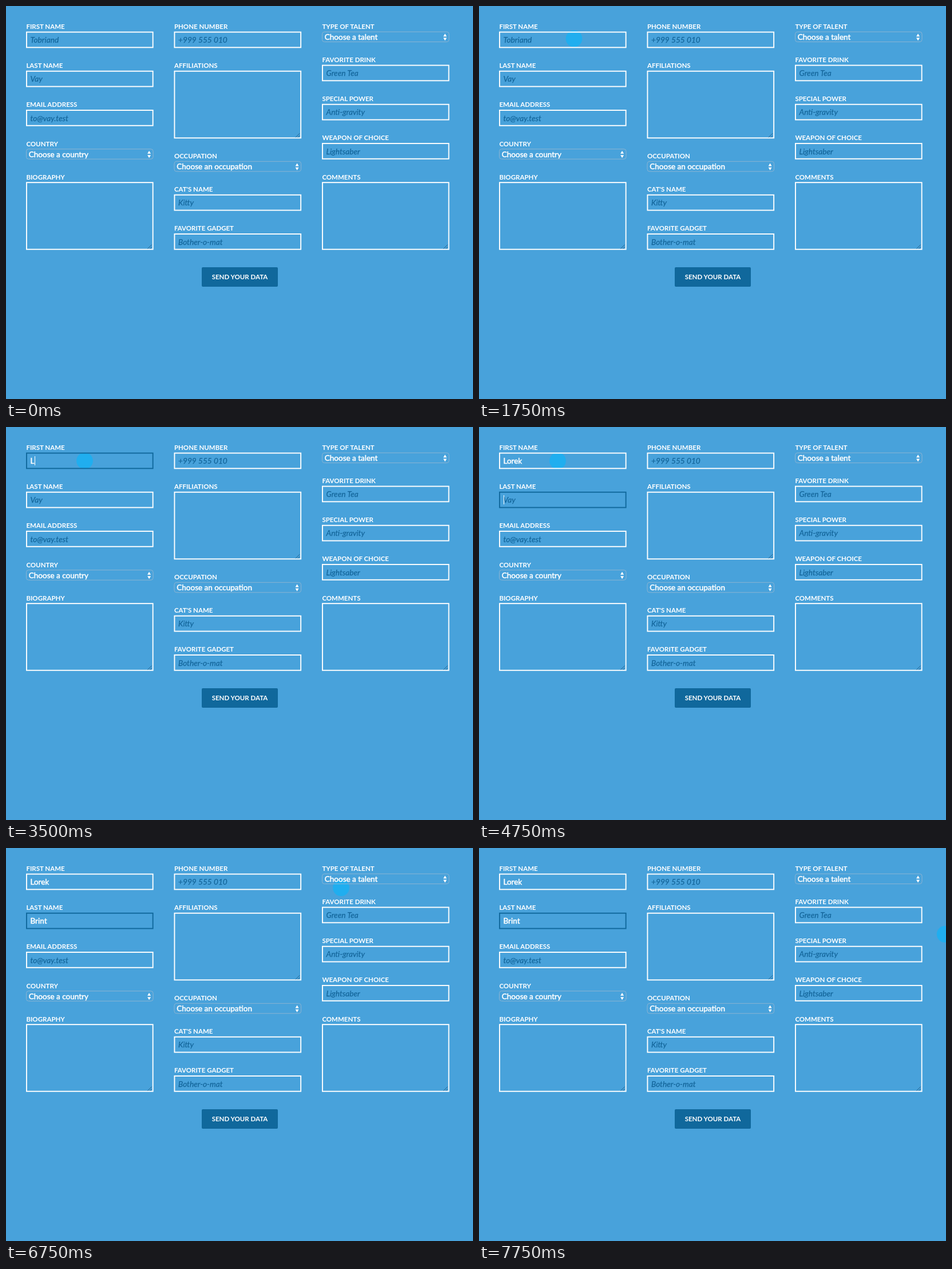
Animation, 816 px wide and 686 px high, one loop 8000 ms. Source, as an HTML page:

```html
<!DOCTYPE html>
<html lang="en">
<head>
<meta charset="utf-8">
<title>Form demo</title>
<style>
  html, body { margin: 0; width: 100%; height: 100%; overflow: hidden; background: #48a2db; }
  svg { display: block; font-family: Lato, sans-serif; font-size: 13.5px; fill: #fff; }
  .label { font-size: 11.5px; font-weight: 700; }
  .hint { font-size: 13.7px; font-style: italic; fill: #14669b; stroke: #14669b; stroke-width: .25; }
  .value { stroke: #fff; stroke-width: .5; }
  .box { fill: none; stroke: #fff; stroke-width: 1.9; }
  .box.focus { stroke: #10689c; }
  .select { fill: none; stroke: #8ab4d3; }
  .grip { fill: none; stroke: #23618c; }
  #dot { fill: #20aeef; }
  #ring { fill: none; stroke: #20aeef; stroke-width: 2; }
</style>
</head>
<body>
<svg id="stage" width="816" height="686" viewBox="0 0 816 686"></svg>
<script>
const LOOP = 8000, STEP = 250, TYPING = 750;
const LEFT = 35, TOP = 44.6, WIDTH = 222.6, COLUMN = 258.5, GAP = 39.5;
const HEIGHT = { input: 28.7, area: 118.5, select: 18.5 };

const text = (x, y, cls, str, id = '') =>
  `<text x="${x}" y="${y}" class="${cls}" id="${id}">${str}</text>`;
const box = (x, y, h, id = '') =>
  `<rect class="box" id="${id}" x="${x + .95}" y="${y + .95}" width="${WIDTH - 1.9}" height="${h - 1.9}"/>`;

const draws = {
  input: (x, y, h, hint, id) =>
    box(x, y, h, id && id + 'Box') + text(x + 7.5, y + 19.5, 'hint', hint, id && id + 'Hint') +
    (id ? text(x + 7.5, y + 19.5, 'value', '', id + 'Value') : ''),

  area(x, y, h) {
    const r = x + WIDTH - 2, b = y + h - 2;
    return box(x, y, h) + `<path class="grip" d="M${r - 8} ${b}l7-7M${r - 4} ${b}l3-3"/>`;
  },

  select(x, y, h, value) {
    const cx = x + WIDTH - 7.5;
    return `<rect class="select" x="${x + .5}" y="${y + .5}" width="${WIDTH - 1}" height="${h - 1}" rx="4"/>` +
      text(x + 4.8, y + 14.3, 'value', value) +
      `<path d="M${cx - 3} ${y + 8.6}h6l-3-5zM${cx - 3} ${y + 11}h6l-3 5z"/>`;
  }
};

const columns = [
  [
    ['input', 'FIRST NAME', 'Tobriand', 'first'],
    ['input', 'LAST NAME', 'Vay', 'last'],
    ['input', 'EMAIL ADDRESS', 'to@vay.test'],
    ['select', 'COUNTRY', 'Choose a country'],
    ['area', 'BIOGRAPHY']
  ], [
    ['input', 'PHONE NUMBER', '+999 555 010'],
    ['area', 'AFFILIATIONS'],
    ['select', 'OCCUPATION', 'Choose an occupation'],
    ['input', "CAT'S NAME", 'Kitty'],
    ['input', 'FAVORITE GADGET', 'Bother-o-mat']
  ], [
    ['select', 'TYPE OF TALENT', 'Choose a talent'],
    ['input', 'FAVORITE DRINK', 'Green Tea'],
    ['input', 'SPECIAL POWER', 'Anti-gravity'],
    ['input', 'WEAPON OF CHOICE', 'Lightsaber'],
    ['area', 'COMMENTS']
  ]
];

// Stack each column's fields below one another.
function layout(fields, col) {
  const x = LEFT + col * COLUMN;
  let y = TOP, out = '';
  for (const [kind, name, value, id] of fields) {
    const h = HEIGHT[kind];
    out += text(x + .4, y - 4.6, 'label', name) + draws[kind](x, y, h, value, id);
    y += h + GAP;
  }
  return out;
}

stage.innerHTML = '<circle id="dot" r="14.4"/>' + columns.map(layout).join('') +
  '<rect x="342" y="456" width="133" height="34" rx="2" fill="#10689c"/>' +
  '<text x="408.5" y="477.4" class="label" text-anchor="middle">SEND YOUR DATA</text>' +
  '<rect id="caret" width="1" height="16"/><circle id="ring" cy="73"/>';

const el = id => document.getElementById(id);
const set = (id, attrs) => {
  for (const k in attrs) el(id).setAttribute(k, attrs[k]);
};

const entries = [
  { id: 'first', word: 'Lorek', y: 51, focus: 2750, blur: 4750, type: 3500, ease: u => u * u * (3 - 2 * u) },
  { id: 'last', word: 'Brint', y: 119, focus: 4750, blur: LOOP, type: 5250, ease: u => u * u }
];
const clicks = [{ x: 166, start: 2000 }, { x: 137.5, start: 2750 }];
const enterX = [609.5, 298.5, 298.5, 184.5, 166];

function dotAt(t) {
  if (t < 750 || t >= 2000 && t < 3500) return [-50, -50];
  if (t < 2000) {
    const x = enterX[(t - 750) / STEP];
    return [x, 57 - .116 * (x - 166)];
  }
  if (t < 6500) return [137.5, 59];
  if (t < 6750) return [297.5, 36.5];
  if (t < 7000) return [585.5, 69.5];
  return [821 - 157.5 * .35 ** ((t - 7000) / STEP), 150.5];
}

function drawEntry({ id, word, y, focus, blur, type, ease }, t) {
  const u = Math.min(1, (t - type) / TYPING);
  const count = u < 0 ? 0 : Math.round(1 + (word.length - 1) * ease(u));
  const active = t >= focus && t < blur;
  el(id + 'Value').textContent = word.slice(0, count);
  set(id + 'Hint', { opacity: count ? 0 : 1 });
  set(id + 'Box', { class: active ? 'box focus' : 'box' });
  if (!active) return;

  // Solid while typing, otherwise half a second on and off.
  const idle = t - (u < 0 ? focus : type + TYPING);
  const shown = u >= 0 && u < 1 || idle % 1000 < 500;
  const x = Math.round(43 + (count && el(id + 'Value').getComputedTextLength()));
  set('caret', { x, y, opacity: +shown });
}

function draw(t) {
  const [cx, cy] = dotAt(t);
  set('dot', { cx, cy });

  const click = clicks.find(c => t >= c.start && t < c.start + 750);
  const age = click ? (t - click.start) / STEP : 0;
  set('ring', { cx: click ? click.x : 0, r: 17.5 + age, opacity: click ? .4 - .1 * age : 0 });

  set('caret', { opacity: 0 });
  entries.forEach(e => drawEntry(e, t));
}

// The picture advances four times a second.
function tick() {
  const t = performance.now() % LOOP;
  draw(t - t % STEP);
  requestAnimationFrame(tick);
}
tick();
</script>
</body>
</html>
```
